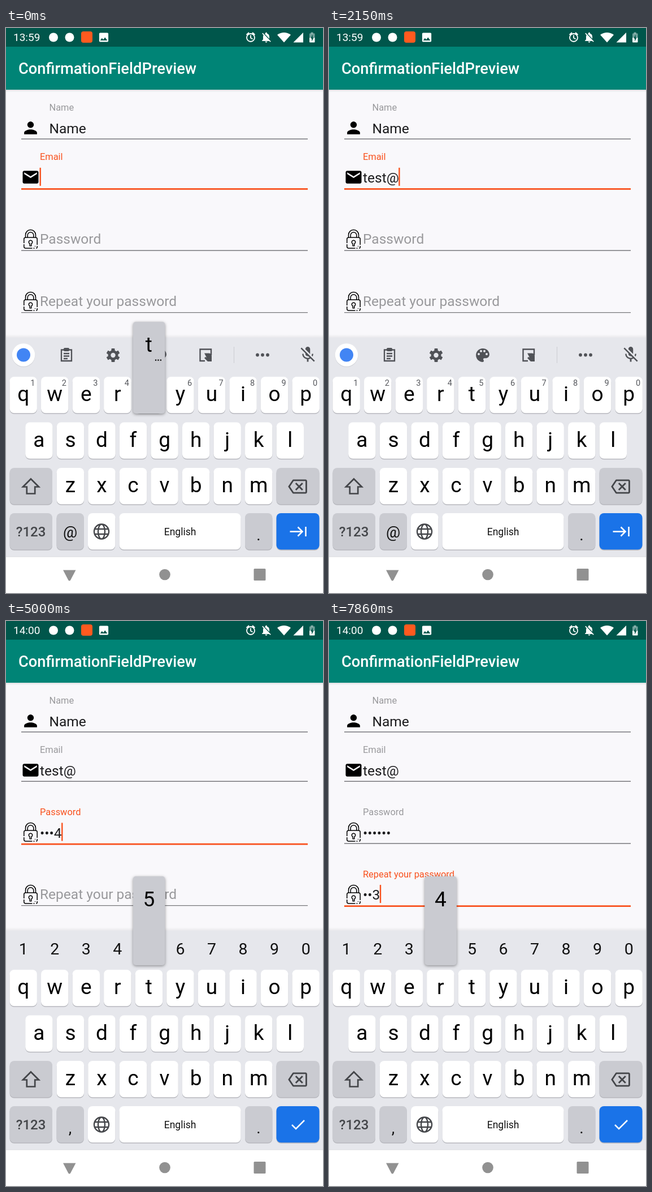
Animation, 561 px wide and 998 px high, one loop 8 s. Source, as an HTML page with a canvas:

```html
<!DOCTYPE html>
<html lang="en">
<head>
<meta charset="utf-8">
<title>Form entry</title>
<style>
html, body { margin: 0; width: 100%; height: 100%; overflow: hidden; }
canvas { display: block; }
</style>
</head>
<body>
<canvas id="stage" width="561" height="998"></canvas>
<script>
const ctx = document.getElementById('stage').getContext('2d');
const LOOP = 8000;
const ORANGE = '#f9511d', INK = '#1c1c1e', ICON = '#505257', FUNC = '#cacbd1';

// Each step changes only the listed parts of the state.
const steps = [
  [0, { clock: '13:59', focus: 1, email: '', pass: '', repeat: '', pop: 't', strip: 'tools', word: '', caret: 1, lift: 1 }],
  [150, { email: 't', pop: '', strip: 'word', word: 't' }],
  [290, { pop: 'e' }],
  [430, { email: 'te', word: 'te', pop: '' }],
  [570, { pop: 's' }],
  [720, { email: 'tes', word: 'tes', pop: 't' }],
  [860, { email: 'test', word: 'test', pop: '' }],
  [1150, { caret: 0 }],
  [1720, { caret: 1 }],
  [2000, { pop: '@' }],
  [2150, { email: 'test@', pop: '', strip: 'tools' }],
  [2570, { focus: 2, lift: 0 }],
  [2720, { strip: 'digits', lift: 1 }],
  [3000, { caret: 0 }],
  [3430, { caret: 1, clock: '14:00' }],
  [3720, { pass: '1', pop: '2' }],
  [3860, { pass: '•2', pop: '' }],
  [4290, { pop: '3' }],
  [4570, { pass: '••3', pop: '4' }],
  [4720, { pass: '•••4', pop: '' }],
  [5000, { pop: '5' }],
  [5150, { pass: '••••5', pop: '' }],
  [5430, { pass: '•••••6' }],
  [5860, { pass: '••••••', focus: 3, lift: 0 }],
  [6000, { lift: .85 }],
  [6150, { lift: 1 }],
  [6430, { caret: 0 }],
  [6720, { caret: 1, pop: '1' }],
  [6860, { repeat: '1', pop: '' }],
  [7150, { pop: '2' }],
  [7570, { repeat: '•2', pop: '3' }],
  [7860, { repeat: '••3', pop: '4' }]
];

const icons = {
  person: 'M12 12c2.21 0 4-1.79 4-4s-1.79-4-4-4-4 1.79-4 4 1.79 4 4 4zm0 2c-2.67 0-8 1.34-8 4v2h16v-2c0-2.66-5.33-4-8-4z',
  mail: 'M20 4H4c-1.1 0-2 .9-2 2v12c0 1.1.9 2 2 2h16c1.1 0 2-.9 2-2V6c0-1.1-.9-2-2-2zm0 4l-8 5-8-5V6l8 5 8-5v2z',
  palette: 'M12 3c-4.97 0-9 4.03-9 9s4.03 9 9 9c.83 0 1.5-.67 1.5-1.5 0-.39-.15-.74-.39-1.01-.23-.26-.38-.61-.38-.99 0-.83.67-1.5 1.5-1.5H16c2.76 0 5-2.24 5-5 0-4.42-4.03-8-9-8z',
  micOff: 'M19 11h-1.7c0 .74-.16 1.43-.43 2.05l1.23 1.23c.56-.98.9-2.09.9-3.28zm-4.02.17c0-.06.02-.11.02-.17V5c0-1.66-1.34-3-3-3S9 3.34 9 5v.18l5.98 5.99zM4.27 3L3 4.27l6.01 6.01V11c0 1.66 1.33 3 2.99 3 .22 0 .44-.03.65-.08l1.66 1.66c-.71.33-1.5.52-2.31.52-2.76 0-5.3-2.1-5.3-5.1H5c0 3.41 2.72 6.23 6 6.72V21h2v-3.28c.91-.13 1.77-.45 2.54-.9L19.73 21 21 19.73z',
  bellOff: 'M20 18.69L7.84 6.14 5.27 3.49 4 4.76l2.8 2.8c-.52 1-.8 2.17-.8 3.43v5l-2 2v1h13.73l2 2L21 19.72zM12 22c1.11 0 2-.89 2-2h-4c0 1.11.89 2 2 2zm6-7.32V11c0-3.08-1.64-5.64-4.5-6.32V4c0-.83-.67-1.5-1.5-1.5s-1.5.67-1.5 1.5v.68c-.5.1-1 .3-1.43.56z',
  image: 'M21 19V5c0-1.1-.9-2-2-2H5c-1.1 0-2 .9-2 2v14c0 1.1.9 2 2 2h14c1.1 0 2-.9 2-2zM8.5 13.5l2.5 3.01L14.5 12l4.5 6H5z',
  backspace: 'M22 3H7c-.69 0-1.23.35-1.59.88L0 12l5.41 8.11c.36.53.9.89 1.59.89h15c1.1 0 2-.9 2-2V5c0-1.1-.9-2-2-2zm0 16H7.07L2.4 12l4.66-7H22zm-11.59-2L14 13.41 17.59 17 19 15.59 15.41 12 19 8.41 17.59 7 14 10.59 10.41 7 9 8.41 12.59 12 9 15.59z'
};

function text(str, x, y, size, color = '#000', align = 'left', weight = 400) {
  ctx.font = `${weight} ${size}px Roboto, sans-serif`;
  ctx.textAlign = align;
  ctx.fillStyle = color;
  ctx.fillText(str, x, y);
}

function rect(x, y, w, h, color, r = 0) {
  ctx.fillStyle = color;
  ctx.beginPath();
  ctx.roundRect(x, y, w, h, r);
  ctx.fill();
}

function disc(x, y, r, color) {
  ctx.fillStyle = color;
  ctx.beginPath();
  ctx.arc(x, y, r, 0, Math.PI * 2);
  ctx.fill();
}

function fill(d, color) {
  ctx.fillStyle = color;
  ctx.fill(new Path2D(d));
}

function line(d, color, width) {
  ctx.strokeStyle = color;
  ctx.lineWidth = width;
  ctx.stroke(new Path2D(d));
}

// Draws a 24-unit icon around a centre.
function icon(name, x, y, scale, color) {
  ctx.save();
  ctx.translate(x - 12 * scale, y - 12 * scale);
  ctx.scale(scale, scale);
  fill(icons[name], color);
  ctx.restore();
}

function shade(y, h, from, to) {
  const g = ctx.createLinearGradient(0, y, 0, y + h);
  g.addColorStop(0, from);
  g.addColorStop(1, to);
  rect(0, y, 561, h, g);
}

function header(clock) {
  rect(0, 0, 561, 33, '#00564b');
  rect(0, 33, 561, 76, '#008476');
  shade(109, 4, '#0000001c', '#00000000');
  text('ConfirmationFieldPreview', 22, 81, 27.3, '#fff', 'left', 500);
  text(clock, 13, 23, 19, '#fff');
  disc(84, 16.5, 8, '#fff');
  disc(112.5, 16.5, 8, '#fff');
  rect(133, 6, 20, 20, '#ff5a1f', 4);
  icon('image', 173, 16.5, .9, '#fff');

  line('M440 17a7 7 0 1 1-14 0a7 7 0 1 1 14 0M433 12.5v5l3.5 2M425.5 12l4.5-4M440.5 12l-4.5-4', '#fff', 1.8);
  icon('bellOff', 460.5, 16.5, .92, '#fff');
  fill('M480 12Q492 4 504 12L492 25.5z', '#fff');
  fill('M508.5 25.5h17.5v-17.5z', '#fff');
  rect(539.5, 7.5, 4, 3, '#ffffff70');
  rect(537, 9.5, 9.5, 8, '#ffffff70', 1);
  rect(537, 17, 9.5, 8.5, '#fff', 1);
  fill('M542.7 11.5v5.2h2l-3.6 7v-5.2h-2z', '#00564b');
}

function lock(y) {
  ctx.save();
  ctx.translate(43.5, y);
  line('M-9-3v-4.5a9 9 0 0 1 18 0V-3M-5.3-3v-4a5.3 5.3 0 0 1 10.6 0v4', '#000', 1.5);
  line('M-11.7 7V0q0-3 3-3H8.7q3 0 3 3V10M11.7 12v2q0 2-2 2M-11.7 9v4q0 3 3 3H3M5 16h2M8 12v1', '#000', 1.5);
  line('M-1.3 8.2a3.2 3.2 0 1 1 2.6 0v3.5h-2.6z', '#000', 1.5);
  ctx.restore();
}

function field(s, i, y, label, value, x = 60) {
  const on = s.focus === i;
  rect(27, y - (on ? .3 : .7), 507, on ? 2.7 : 1.4, on ? ORANGE : '#77777b');
  const lift = value ? 1 : on ? s.lift : 0;
  const color = on ? (lift ? ORANGE : '#77777a') : '#99999c';
  text(label, x, y - 11.7 - 38.3 * lift, 24.5 - 8.1 * lift, color);
  text(value, x, y - 10.5, 24.5, INK);
  if (!on) return;
  const w = ctx.measureText(value).width;
  if (i === 1 && value && !value.includes('@')) rect(x, y - 9.5, w, 1.4, INK);
  if (s.caret) rect(x + w - .5, y - 36.5, 2.4, 32, ORANGE);
}

function form(s) {
  icon('person', 43.5, 176.5, 1.42, '#000');
  icon('mail', 43.5, 263.5, 1.4, '#000');
  lock(373);
  lock(483);
  field(s, 0, 196, 'Name', 'Name', 76.5);
  field(s, 1, 283.3, 'Email', s.email);
  field(s, 2, 393, 'Password', s.pass);
  field(s, 3, 502.6, 'Repeat your password', s.repeat);
}

function keycap(x, y, w, color = '#fff') {
  rect(x, y + 1.5, w, 64.3, '#b6b7bd', 8);
  rect(x, y, w, 64.3, color, 8);
}

const PITCH = 55.55;
const rows = [['qwertyuiop', 6.5, 616], ['asdfghjkl', 34.2, 696.5], ['zxcvbnm', 89.7, 777]];
const digits = [...'1234567890'];
const spots = { '@': [113.5, 857] };
for (const [chars, x, y] of rows)
  [...chars].forEach((c, i) => spots[c] = [x + 24.2 + i * PITCH, y]);
digits.forEach((c, i) => spots[c] = [30.7 + i * PITCH, 548]);

function gear(x, y) {
  ctx.save();
  ctx.translate(x, y);
  for (let i = 0; i < 6; i++) {
    rect(-3, -12, 6, 6, ICON, 1);
    ctx.rotate(Math.PI / 3);
  }
  disc(0, 0, 9, ICON);
  disc(0, 0, 4.2, '#e6e7ec');
  ctx.restore();
}

function tools() {
  line('M98 568.5h18v19.5h-18zM102 575h10M102 579.5h10M102 584h7', ICON, 2.3);
  rect(102, 565, 10, 6, ICON, 2);
  gear(189.5, 578);
  icon('palette', 272, 578, 1.32, ICON);
  for (const [x, y] of [[265, 576], [269, 570.7], [275, 570.7], [279, 576]]) disc(x, y, 2, '#e6e7ec');
  line('M352 588H343.5V567.5H363V578', ICON, 2.4);
  fill('M351 574.5h8a5 5 0 0 1 5 5v9.5h-7l-6-6 2-2 2 1z', ICON);
  rect(403, 563, 1, 29, '#cbccd1');
  for (const x of [445, 454, 463]) disc(x, 577.5, 2.9, ICON);
}

function strip(s) {
  if (s.strip === 'digits') {
    digits.forEach(c => text(c, spots[c][0], 589, 28.5, '#111', 'center'));
    return;
  }
  disc(31, 578.5, 20.5, '#d4d5da');
  disc(31, 577.5, 20.3, '#fff');
  disc(31, 577.5, 12, '#4285f4');
  if (s.strip === 'tools') tools();
  else text(s.word, 279.5, 587, 24, '#44464a', 'center');
  icon('micOff', 534, 577, 1.4, ICON);
}

function popup(c) {
  const [x, keyY] = spots[c];
  const digit = c >= '0' && c <= '9';
  const y = keyY - 97;
  ctx.save();
  ctx.shadowColor = '#00000066';
  ctx.shadowBlur = 5;
  ctx.shadowOffsetY = 1.5;
  rect(x - 28, y, 56.5, digit ? 157 : 162, FUNC, 5);
  ctx.restore();
  text(c, x, y + 52.5, 37, '#000', 'center');
  if (!digit) for (let i = 0; i < 3; i++) rect(x + 11 + i * 4.4, y + 66.5, 2.3, 2.3, '#111');
}

function keyboard(s) {
  const secret = s.strip === 'digits';
  shade(541, 6, '#00000000', '#00000010');
  rect(0, 547, 561, 387, '#e6e7ec');
  strip(s);
  for (const [chars, , y] of rows) {
    [...chars].forEach((c, i) => {
      const x = spots[c][0];
      keycap(x - 24.2, y, 48.4);
      text(c, x, y + 43, 37, '#000', 'center');
      if (y === 616 && !secret) text(digits[i], x + 16.5, y + 16, 14.5, '#56585d', 'center');
    });
  }
  keycap(6.5, 777, 75.5, FUNC);
  line('M44 796.5L58 810.5H51.2V822.5H36.8V810.5H30z', '#44464a', 2.7);
  keycap(478.5, 777, 76, FUNC);
  icon('backspace', 516, 810, 1.4, '#44464a');

  keycap(6.5, 857, 75.5, FUNC);
  text('?123', 44, 898, 24, '#44464a', 'center', 500);
  keycap(89.5, 857, 48.4, FUNC);
  text(secret ? ',' : '@', 113.5, secret ? 905 : 900, 28, '#111', 'center');
  keycap(145, 857, 48.4);
  ctx.beginPath();
  ctx.ellipse(169, 889.5, 13, 13, 0, 0, 7);
  ctx.moveTo(175, 889.5);
  ctx.ellipse(169, 889.5, 6, 13, 0, 0, 7);
  ctx.strokeStyle = '#44464a';
  ctx.lineWidth = 2.4;
  ctx.stroke();
  line('M157 885h24M157 894h24', '#44464a', 2.4);
  keycap(200.5, 857, 215);
  text('English', 308, 896, 17.5, '#111', 'center');
  keycap(423, 857, 48.4, FUNC);
  text('.', 447, 905, 28, '#111', 'center');
  keycap(478.5, 857, 76, '#1a73e8');
  line(secret ? 'M506 890l7 7 15-15' : 'M502.5 889.5h21M516.5 881.5l8 8-8 8M530.5 881v17', '#fff', 2.5);
}

function navBar() {
  rect(0, 934, 561, 64, '#fff');
  rect(0, 933.5, 561, 1, '#dcdde1');
  fill('M101 957.5h22.5l-9.5 18q-1.8 2-3.6 0z', '#919191');
  disc(281, 965.5, 9.8, '#919191');
  rect(438.5, 955, 21, 21, '#919191', 1.5);
}

function draw(now) {
  const t = now % LOOP;
  const s = Object.assign({}, ...steps.filter(([at]) => at <= t).map(step => step[1]));
  rect(0, 0, 561, 998, '#f9f8fb');
  header(s.clock);
  form(s);
  keyboard(s);
  navBar();
  if (s.pop) popup(s.pop);
}

const start = performance.now();
function tick() {
  draw(performance.now() - start);
  requestAnimationFrame(tick);
}
tick();
</script>
</body>
</html>
```
